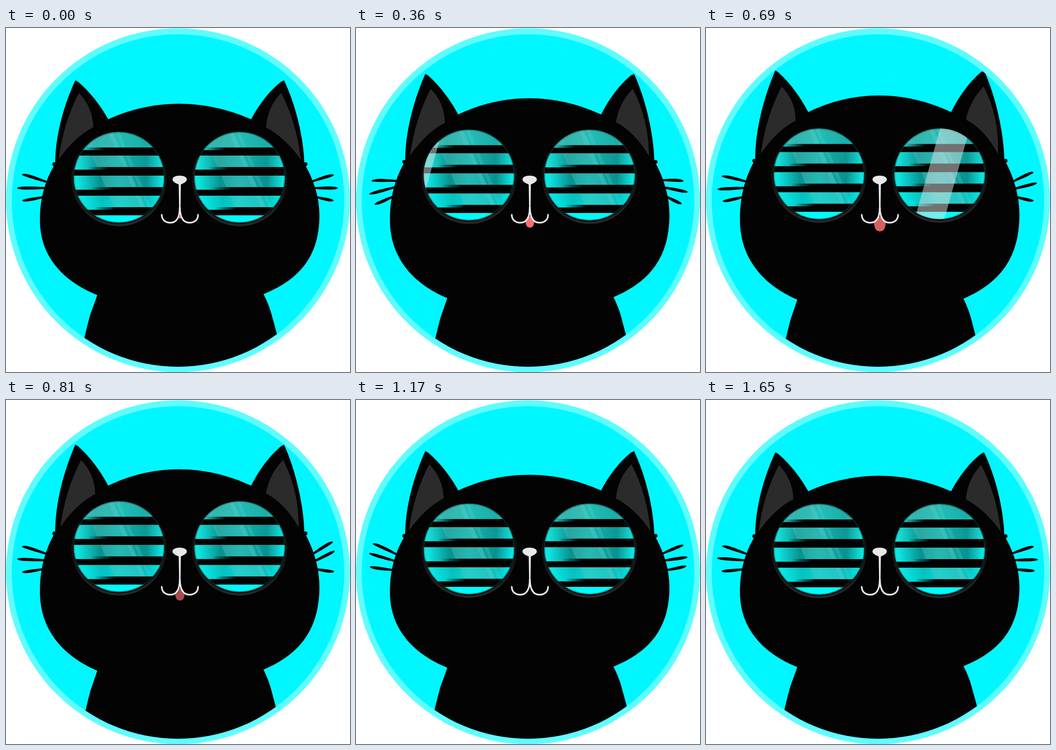
An HTML page with a canvas that plays this animation: 720x720 px, repeating every 1.68 s.

```html
<!DOCTYPE html>
<html lang="en">
<head>
<meta charset="utf-8">
<title>Cool cat</title>
<style>
html, body { margin: 0; width: 100%; height: 100%; overflow: hidden; background: #fff; }
canvas { display: block; width: 720px; height: 720px; }
</style>
</head>
<body>
<canvas id="stage" width="720" height="720"></canvas>
<script>
const ctx = document.getElementById('stage').getContext('2d');
const LOOP = 1680, STEP = 30;
const BLACK = '#030303', CYAN = '#00f7ff', RING = '#5ffcff', INK = '#e8e8e8';

const CAT = new Path2D(`M145 109.5 Q148 110.5 152 113.5 C176 134 198 162 214 191
  C260 170 310 158.5 362 158.5 C415 158.5 465 170 513 191
  C529.5 160 551 132 575 113 Q580 110 582 109.5 C606 160 623 228 624.5 284
  C641 312 656 350 656 392 C656 476 616 526 539 557
  C547 573 552 585 556 600 C560 615 564 628 567 641 L590 730 L140 730
  L164 649 C167 636 172 615 177 598 C182 584 187 571 191 559
  C117 529 71 476 71 402 C71 352 84 315 103 284 C103 225 121 162 145 109.5Z`);
const NOSE = new Path2D(`M363.5 309 C372 309 378.5 312 378.5 317 C378.5 322 371 325 366 327.5
  L365.3 382 L362.3 382 L361.5 327.5 C356 325 348.5 322 348.5 317 C348.5 312 355 309 363.5 309Z`);
const MOUTH = new Path2D(`M363.6 376 C363.6 396 357 407.5 344 407.5 C333 407.5 326 401 326 391
  M364 376 C364.4 396 371 407.5 384 407.5 C395 407.5 402 401 402 391`);
const TONGUE = new Path2D(`M364 394 L355 401 Q350 405 350.5 411
  C352 423 356 428.5 364 428.5 C372 428.5 376 423 377 411 Q377.5 405 373 401Z`);

// Tip heights over time; the tip's x follows a shallow arc around yc.
const KEYS = [0, 210, 310, 570, 810, 1170, 1260, 1650, 1680];
const WHISKERS = [
  { base: [90, 324], x: 32, yc: 318, arc: .009, bend: -2, tip: [307, 317, 322, 314, 307, 301, 300, 306, 306.5] },
  { base: [88, 335], x: 23, yc: 334, arc: .025, bend: 0, tip: [335, 345, 349, 342, 333, 321, 318, 331, 332] },
  { base: [82, 353], x: 26, yc: 330, arc: .0083, bend: 1, tip: [361, 367, 370, 365, 360, 349, 347, 358, 359] },
  { base: [638, 322], x: 686.5, yc: 312, arc: -.009, bend: -1.5, tip: [308, 327, 324, 307, 297, 304, 305, 307, 308] },
  { base: [640, 335], x: 695, yc: 337, arc: -.016, bend: 0, tip: [335, 347, 346, 333, 316, 329, 331, 334, 335] },
  { base: [646, 353], x: 694, yc: 330, arc: -.0083, bend: 1, tip: [361, 366, 369, 364, 359, 347, 346, 357, 358] }
];

function keyed(values, t) {
  let i = 1;
  while (i < KEYS.length - 1 && t > KEYS[i]) i++;
  const p = (t - KEYS[i - 1]) / (KEYS[i] - KEYS[i - 1]);
  return values[i - 1] + (values[i] - values[i - 1]) * p;
}

function disc(x, y, r, fill) {
  ctx.beginPath();
  ctx.arc(x, y, r, 0, Math.PI * 2);
  ctx.fillStyle = fill;
  ctx.fill();
}

function gradient(x0, y0, x1, y1, ...stops) {
  const g = ctx.createLinearGradient(x0, y0, x1, y1);
  stops.forEach(([at, color]) => g.addColorStop(at, color));
  return g;
}

function rect(x, y, w, h, fill) {
  ctx.fillStyle = fill;
  ctx.fillRect(x, y, w, h);
}

// Band between two parallel slanted edges; x is its left edge at height y0.
function slant(x, w, y0, y1, slope, fill) {
  const dx = (y1 - y0) * slope;
  ctx.beginPath();
  ctx.moveTo(x, y0);
  ctx.lineTo(x + w, y0);
  ctx.lineTo(x + w + dx, y1);
  ctx.lineTo(x + dx, y1);
  ctx.fillStyle = fill;
  ctx.fill();
}

function whisker(w, t) {
  const ty = keyed(w.tip, t), tx = w.x + w.arc * (ty - w.yc) ** 2;
  // The root swings slightly against the tip.
  const bx = w.base[0], by = w.base[1] - .28 * (ty - w.tip[0]);
  const len = Math.hypot(bx - tx, by - ty);
  ctx.save();
  ctx.translate(tx, ty);
  ctx.rotate(Math.atan2(by - ty, bx - tx));
  const b = bx > tx ? w.bend : -w.bend;
  ctx.beginPath();
  ctx.moveTo(0, 0);
  ctx.bezierCurveTo(2, b - 4, len * .4, b - 4, len, -1.6);
  ctx.lineTo(len, 1.6);
  ctx.bezierCurveTo(len * .4, b + 4, 2, b + 4, 0, 0);
  ctx.fillStyle = BLACK;
  ctx.fill();
  ctx.restore();
}

function innerEar([ax, ay], [cx, cy], [bx, by], side) {
  ctx.beginPath();
  ctx.moveTo(ax, ay);
  ctx.quadraticCurveTo(ax + side * 28.5, ay + 28.5, cx, cy);
  ctx.quadraticCurveTo(cx - side * 40, cy + 21, bx, by);
  ctx.quadraticCurveTo(ax - side * 33, ay + 64, ax, ay);
  ctx.fillStyle = '#2b2b2b';
  ctx.fill();
}

function lens(x, dy, t) {
  ctx.save();
  ctx.translate(x, dy);
  disc(0, 313, 101, BLACK);
  ctx.beginPath();
  ctx.arc(0, 315, 97.5, 0, Math.PI * 2);
  ctx.lineWidth = 5;
  ctx.strokeStyle = gradient(0, 260, 0, 412, [0, 'rgba(36,36,36,0)'], [.5, '#141414'], [1, '#262626']);
  ctx.stroke();

  ctx.beginPath();
  ctx.arc(0, 312.5, 95, 0, Math.PI * 2);
  ctx.clip();
  rect(-95, 217, 190, 192, gradient(0, 217, 0, 408,
    [0, '#2fd0c8'], [.25, '#18dcd6'], [.6, '#0ce6e2'], [.85, '#04f4f2'], [1, '#00ffff']));

  // Smoky tint, darkest towards the lower edge of each gap.
  [[217, 250], [267, 291], [309, 333], [351, 375]].forEach(([top, bottom], i) => {
    const a = [.25, .42, .48, .25][i], shift = i * 5;
    rect(-95, top, 190, bottom - top + 6, gradient(-95, 0, 95, 0,
      [.05, 'rgba(0,55,55,0)'], [.24 + shift / 190, `rgba(0,55,55,${a})`],
      [.5, `rgba(0,55,55,${a * .6})`], [.8, `rgba(0,55,55,${a})`], [.97, 'rgba(0,55,55,0)']));
  });
  slant(-78, 64, 217, 376, .43, 'rgba(90,195,185,.35)');
  slant(-23, 11, 217, 376, .43, 'rgba(115,215,208,.2)');
  slant(-8, 8, 217, 376, .43, 'rgba(115,215,208,.2)');

  [[250, 267], [291, 309], [333, 351], [375, 392]].forEach(([top, bottom], i) => {
    const from = -72 + i * 7;
    rect(-95, top, 190, 6.5, gradient(from, 0, from + 42, 0, [0, 'rgba(3,3,3,0)'], [1, BLACK]));
    rect(-95, top + 5.5, 190, bottom - top - 5.5, BLACK);
  });

  ctx.beginPath();
  ctx.arc(0, 312.5, 94.5, 0, Math.PI * 2);
  ctx.lineWidth = 3;
  ctx.strokeStyle = 'rgba(0,70,70,.4)';
  ctx.stroke();

  // Flash of light sweeping across both lenses.
  const lead = 158 + 1.124 * (t - 360);
  slant(lead - 62 + 28 - x, 62, 200, 420, -.28, 'rgba(225,225,225,.5)');
  ctx.restore();
}

function draw(t) {
  const lift = Math.max(0, Math.min(t, 1235 - t, 612));
  const p = lift / 570, dy = -7.6 * p;

  rect(0, 0, 720, 720, '#fff');
  disc(360, 360.5, 360, RING);
  disc(360, 361, 348, CYAN);

  WHISKERS.forEach(w => whisker(w, t));

  ctx.save();
  ctx.beginPath();
  ctx.arc(360, 361, 348, 0, Math.PI * 2);
  ctx.clip();
  ctx.translate(0, 416);
  ctx.scale(1, 1 + .07 * p);
  ctx.translate(0, -416);
  ctx.fillStyle = BLACK;
  ctx.fill(CAT);
  ctx.restore();

  innerEar([152.5 + 6 * p, 136 - 14 * p], [183 + 5 * p, 207.5 - 14.5 * p], [110 + 5 * p, 275.5 - 13 * p], 1);
  innerEar([576 + 5.5 * p, 136 - 14 * p], [544, 208 - 17 * p], [617 - 6 * p, 275.5 - 12 * p], -1);

  disc(101, 285 + dy, 4, BLACK);
  disc(627, 285 + dy, 4, BLACK);
  lens(236.5, dy, t);
  lens(489, dy, t);

  const open = t <= 600 ? .17 + .00146 * t : Math.max(0, 1.046 - .0014 * (t - 600));
  ctx.save();
  ctx.globalAlpha = t <= 600 ? 1 : Math.max(0, 1 - (t - 600) / 620);
  ctx.translate(364, 393);
  ctx.scale(open, open);
  ctx.translate(-364, -393);
  ctx.fillStyle = '#f97070';
  ctx.fill(TONGUE);
  ctx.restore();

  ctx.fillStyle = ctx.strokeStyle = INK;
  ctx.fill(NOSE);
  ctx.lineWidth = 3.4;
  ctx.lineCap = 'round';
  ctx.stroke(MOUTH);
}

const start = performance.now();
function frame() {
  const t = (performance.now() - start) % LOOP;
  draw(Math.floor(t / STEP) * STEP);
  requestAnimationFrame(frame);
}
frame();
</script>
</body>
</html>
```
